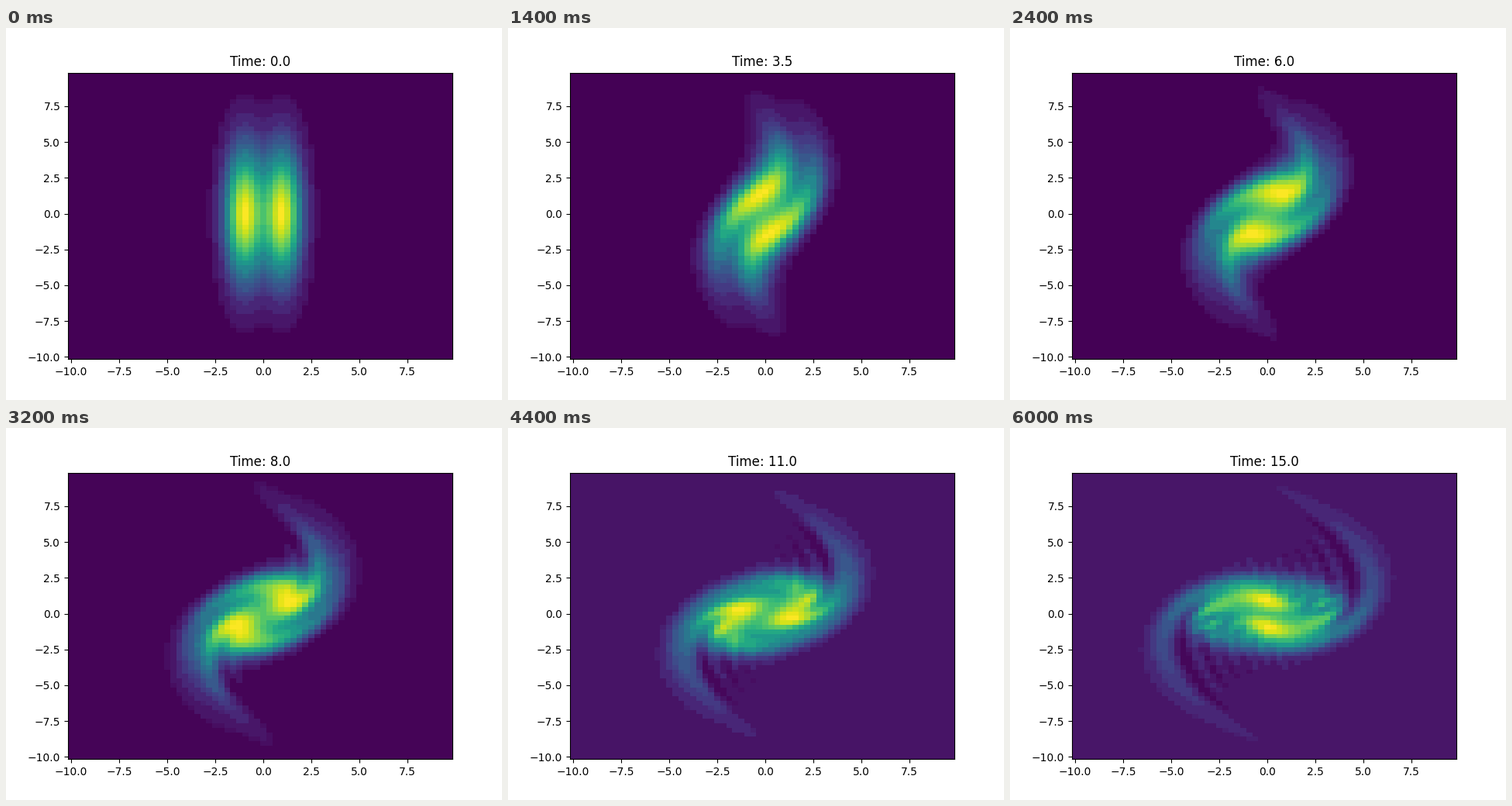
Write a matplotlib script that moves like this. It is 640 px wide and 480 px high and loops after 6.2 s.

```python
import numpy as np
import matplotlib.pyplot as plt
from matplotlib.animation import FuncAnimation

N, L = 64, 20.0
NU = 0.001
FRAMES, STEP, SUBSTEPS = 31, 0.5, 12
H = L / N

x = -L / 2 + H * np.arange(N)
X, Y = np.meshgrid(x, x)

k = 2 * np.pi * np.fft.fftfreq(N, H)
K2 = k[None, :] ** 2 + k[:, None] ** 2
K2[0, 0] = np.inf  # drops the mean of the stream function


def diff(f, axis):
    return (np.roll(f, -1, axis) - np.roll(f, 1, axis)) / (2 * H)


def laplacian(f):
    near = sum(np.roll(f, s, a) for s in (1, -1) for a in (0, 1))
    return (near - 4 * f) / H**2


def rate(w):
    psi = np.real(np.fft.ifft2(-np.fft.fft2(w) / K2))
    advection = diff(psi, 1) * diff(w, 0) - diff(psi, 0) * diff(w, 1)
    return NU * laplacian(w) + advection


def rk4(w, dt):
    a = rate(w)
    b = rate(w + dt / 2 * a)
    c = rate(w + dt / 2 * b)
    d = rate(w + dt * c)
    return w + dt / 6 * (a + 2 * b + 2 * c + d)


def simulate():
    """Two elongated Gaussian vortices merging on a periodic square."""
    w = sum(np.exp(-(X - c) ** 2 - Y**2 / 20) for c in (-1, 1))
    states = [w]
    for _ in range(FRAMES - 1):
        for _ in range(SUBSTEPS):
            w = rk4(w, STEP / SUBSTEPS)
        states.append(w)
    return states


def colours(w):
    """Autoscaled viridis, banded by the top four bits of each channel."""
    level = (w - w.min()) / (w.max() - w.min())
    rgb = np.round(plt.get_cmap("viridis")(level)[..., :3] * 255).reshape(-1, 3)
    bins = (rgb // 16) @ np.array([256, 16, 1])
    _, band = np.unique(bins, return_inverse=True)
    band = band.ravel()
    count = np.bincount(band)
    mean = np.stack([np.bincount(band, c) / count for c in rgb.T], axis=1)
    return (mean[band] / 255).reshape(N, N, 3)


images = [colours(w) for w in simulate()]

fig, ax = plt.subplots(figsize=(6.4, 4.8), dpi=100)
mesh = ax.pcolormesh(x, x, images[0], shading="nearest")
title = ax.set_title("Time: 0.0")


def update(i):
    mesh.set_array(images[i])
    title.set_text(f"Time: {i * STEP:.1f}")
    return mesh, title


anim = FuncAnimation(fig, update, frames=FRAMES, interval=200,
                     repeat=True, repeat_delay=0, blit=False)
plt.show()
```
